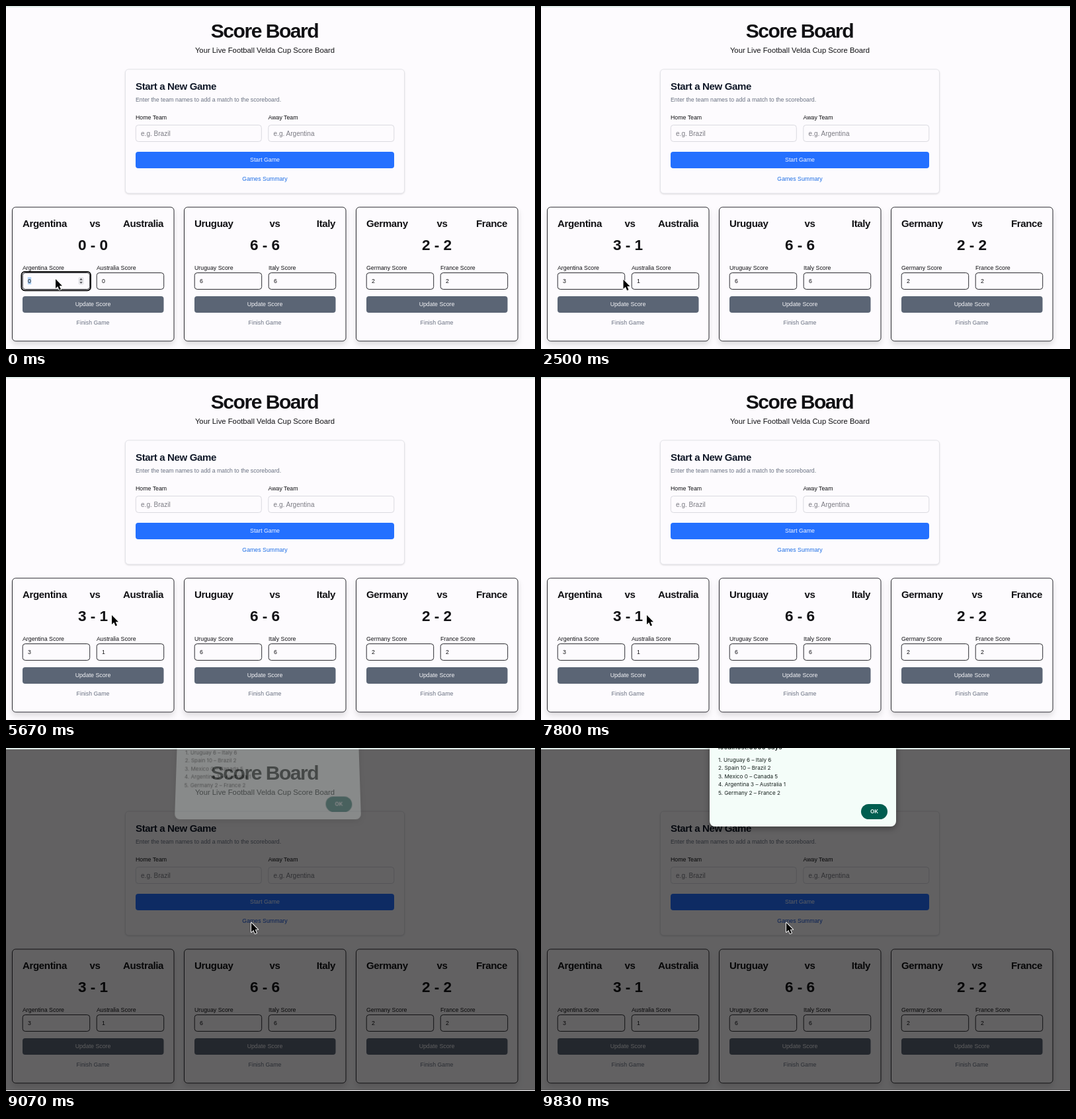
These frames come from a looping animation (800x520 px, 9.86 s). An HTML page:

```html
<!DOCTYPE html>
<html lang="en">
<head>
<meta charset="utf-8">
<title>Score Board</title>
<style>
html, body { margin: 0; width: 100%; height: 100%; overflow: hidden; background: #fdfbfe; }
svg { position: absolute; left: 0; top: 0; }
#page { font-family: "Liberation Sans", Arial, sans-serif; }
.card { fill: #fdfbfe; }
.form { stroke: #e3e3e8; filter: drop-shadow(0 1px 1px rgba(0,0,0,.12)); }
.game { stroke: #2b2b30; filter: drop-shadow(0 5px 4px rgba(0,0,0,.12)); }
#shade { position: absolute; left: 0; top: 2px; width: 800px; height: 517px; background: rgba(0,0,0,.61); }
#dialog {
  position: absolute; left: 255px; top: -30px; width: 282px; height: 149px;
  border-radius: 8px; background: #f4fdf9; color: #17201e; transform-origin: 50% 100%;
  box-shadow: 0 3px 10px rgba(0,0,0,.35); font: 8.16px/12.6px Inter, sans-serif;
}
#dialog > * { position: absolute; left: 13px; white-space: pre; }
#dialog h2 { top: 23px; margin: 0; font-size: 9.8px; font-weight: 600; }
#dialog p { top: 41.7px; margin: 0; }
#dialog b { left: 229px; top: 114.5px; width: 40px; height: 23px; border-radius: 12px;
  background: #005e50; color: #fff; font-weight: 600; line-height: 23px; text-align: center; }
</style>
</head>
<body>
<svg id="page" width="800" height="520"></svg>
<div id="shade"></div>
<div id="dialog">
  <h2>localhost:3000 says</h2>
  <p>1. Uruguay 6 – Italy 6
2. Spain 10 – Brazil 2
3. Mexico 0 – Canada 5
4. Argentina 3 – Australia 1
5. Germany 2 – France 2</p>
  <b>OK</b>
</div>
<svg id="cursor" width="20" height="24" viewBox="-2 -2 20 24">
  <path d="M0 0V14L3.3 11L5.6 16.4L8 15.4L5.7 10.2H10Z" stroke="#fff" stroke-width="1.8" paint-order="stroke" stroke-linejoin="round"/>
</svg>
<script>
const LOOP = 9860, SMALL = 8.79, INK = '#111114', GRAY = '#6a7282';
const $ = id => document.getElementById(id);

const text = (x, y, str, size = SMALL, fill = INK, extra = '') =>
  `<text x="${x}" y="${y}" font-size="${size}" fill="${fill}" ${extra}>${str}</text>`;
const rect = (x, y, w, h, extra, r = 4) =>
  `<rect x="${x}" y="${y}" width="${w}" height="${h}" rx="${r}" ${extra}/>`;
const MID = 'text-anchor="middle"', END = 'text-anchor="end"';
const bold = (track, anchor = '') => `font-weight="bold" letter-spacing="${track}" ${anchor}`;

function form() {
  const field = (x, label, hint) => text(x, 172, label) +
    rect(x + .3, 180.5, 190, 25, 'fill="none" stroke="#dadae0"') +
    text(x + 8, 196.7, hint, 10.05, '#7b7b83');
  return rect(0, 0, 800, 2, 'fill="#dfebe8"', 0) +
    text(391, 48, 'Score Board', 30.1, INK, bold(-1.505, MID)) +
    text(391.5, 70.5, 'Your Live Football Velda Cup Score Board', 11.3, INK, MID) +
    rect(180.5, 96, 422, 188, 'class="card form"', 5) +
    text(196, 126.5, 'Start a New Game', 15.07, '#101828', bold(-.377)) +
    text(196, 144.5, 'Enter the team names to add a match to the scoreboard.', SMALL, GRAY) +
    field(196, 'Home Team', 'e.g. Brazil') + field(396.5, 'Away Team', 'e.g. Argentina') +
    rect(196, 221, 391, 25, 'fill="#2470ff"') +
    text(391.5, 236.3, 'Start Game', SMALL, '#f4f6ff', MID) +
    text(391.5, 265.2, 'Games Summary', SMALL, '#1f6fe5', MID + ' id="link"');
}

function game(i, home, away, a, b, vsX) {
  const x = 9.5 + i * 260, left = x + 15.5, right = x + 229, mid = x + 122;
  const field = (fx, team, value, side) => text(fx, 400.3, team + ' Score') +
    rect(fx + .2, 404.5, 101.5, 25, 'fill="none" stroke="#2b2b30"') +
    `<g id="focus${i}${side}" visibility="hidden">` +
    rect(fx - 1.6, 402.9, 104.6, 28.4, 'fill="none" stroke="#000" stroke-width="1.8"', 5) +
    rect(fx + 84.5, 411, 8, 11.5, 'fill="#e6e6e9"', 2) +
    `<path d="M${fx + 86.3} 415.4l2.2-2.6 2.2 2.6zM${fx + 86.3} 418.2l2.2 2.6 2.2-2.6z" fill="#44444a"/></g>` +
    rect(fx + 7.8, 411, 5.4, 11, `id="select${i}${side}" fill="#b4d5f8" visibility="hidden"`, 0) +
    text(fx + 8, 419.7, value, SMALL, INK, `id="value${i}${side}"`);
  return rect(x, 305, 244.5, 203, 'class="card game"', 5) +
    text(left, 335.2, home, 15.07, INK, bold(-.377)) +
    text(vsX, 335.2, 'vs', 15.07, INK, bold(-.377, MID)) +
    text(right - .4, 335.2, away, 15.07, INK, bold(-.377, END)) +
    text(mid, 369.8, `${a} - ${b}`, 22.6, INK, bold(0, MID) + ` id="score${i}"`) +
    field(left, home, a, 0) + field(left + 112, away, b, 1) +
    rect(left, 440, 213.5, 25, `id="update${i}" fill="#5b6575"`) +
    text(mid, 455.2, 'Update Score', SMALL, '#f3f3f6', MID) +
    text(mid, 482.7, 'Finish Game', SMALL, GRAY, MID);
}

$('page').innerHTML = form() + game(0, 'Argentina', 'Australia', 0, 0, 134.5) +
  game(1, 'Uruguay', 'Italy', 6, 6, 406.5) + game(2, 'Germany', 'France', 2, 2, 659.5);

// Pointer stops: time, x, y
const path = [[0, 75, 414], [530, 75, 414], [950, 172, 415], [1480, 172, 415], [1830, 105, 441],
  [1960, 102, 449], [2280, 102, 449], [2800, 160, 361], [7830, 160, 361], [8620, 371, 265], [LOOP, 371, 265]];

function pointer(t) {
  const n = path.findIndex(p => p[0] > t);
  const [t0, x0, y0] = path[n - 1], [t1, x1, y1] = path[n];
  const u = (t - t0) / (t1 - t0), e = u * u * (3 - 2 * u);
  return [x0 + (x1 - x0) * e, y0 + (y1 - y0) * e];
}

const show = (id, on) => $(id).setAttribute('visibility', on ? 'visible' : 'hidden');

function draw(t) {
  const [x, y] = pointer(t);
  $('cursor').style.transform = `translate(${x - 2}px,${y - 2}px)`;
  show('focus00', t < 1000);
  show('select00', t < 300);
  show('focus01', t >= 1000 && t < 2130);
  show('select01', t >= 1060 && t < 1330);
  $('value00').textContent = t < 300 ? 0 : 3;
  $('value01').textContent = t < 1330 ? 0 : 1;
  $('score0').textContent = t < 2160 ? '0 - 0' : '3 - 1';
  $('update0').setAttribute('fill', y > 441.2 && y < 465 ? '#4a5565' : '#5b6575');
  $('link').setAttribute('fill', x > 357 && y > 256 && y < 270 ? '#1150d8' : '#1f6fe5');

  const open = t >= 9050, q = Math.min(1, Math.max(0, (t - 9037) / 130)), k = 1 - q;
  $('shade').hidden = $('dialog').hidden = !open;
  $('dialog').style.opacity = q;
  $('dialog').style.transform = k
    ? `perspective(600px) translateY(${-14.7 * k}px) rotateX(${10.7 * k}deg) scaleY(${1 + .053 * k})` : 'none';
}

const start = performance.now();
function tick() {
  draw((performance.now() - start) % LOOP);
  requestAnimationFrame(tick);
}
tick();
</script>
</body>
</html>
```
